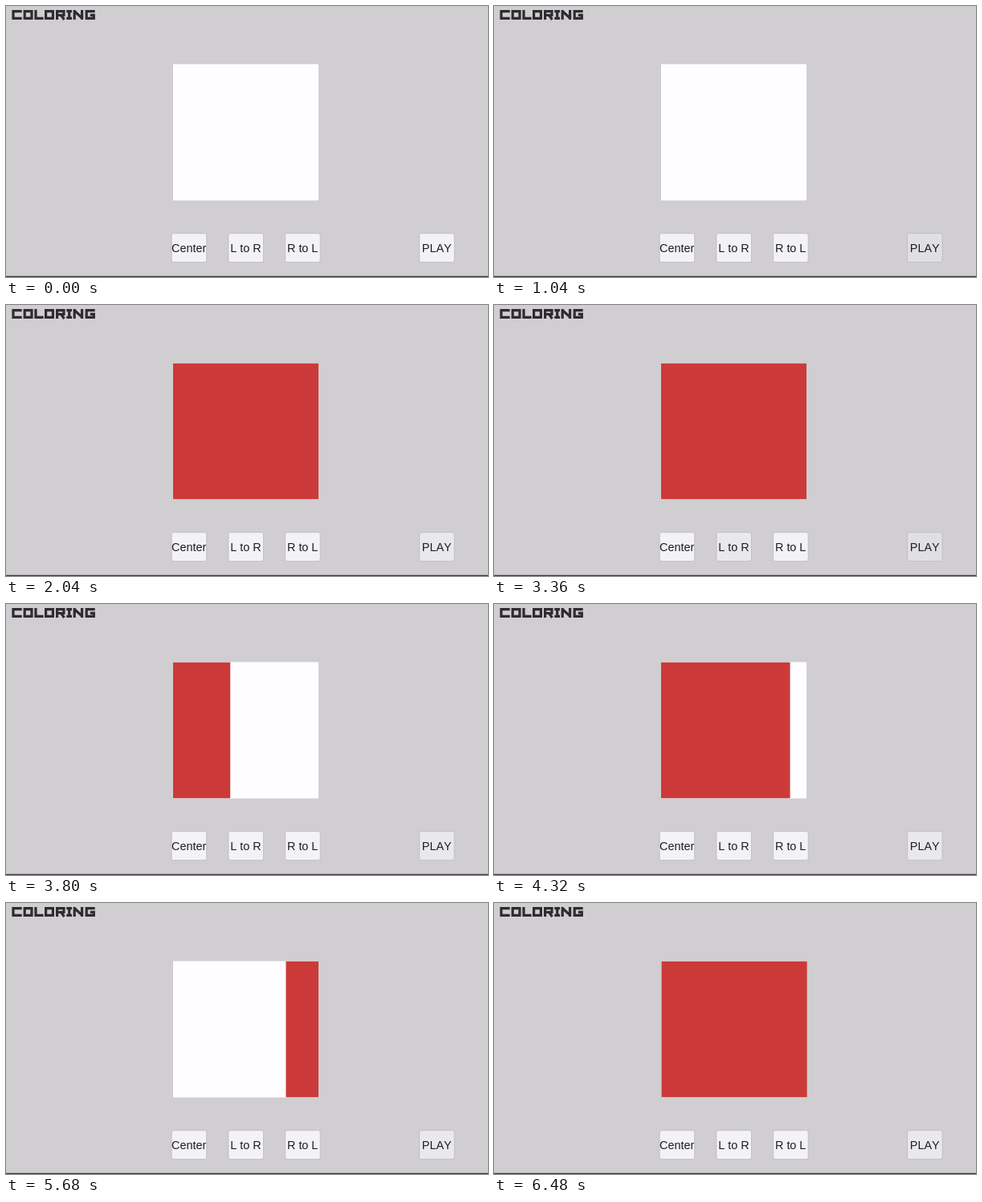
Recreate the animation shown at these times as an HTML page. Size 600x338 px, loop 7.32 s.

```html
<!DOCTYPE html>
<html lang="en">
<head>
<meta charset="utf-8">
<title>Coloring</title>
<style>
  html, body { margin: 0; width: 100%; height: 100%; overflow: hidden; background: #d0ced0; }
  svg { display: block; width: 100vw; height: 100vh; }

  .title { fill: none; stroke: #2e2c30; stroke-width: 3.2; }
  .key rect { width: 43.6px; height: 36px; fill: #f3f2f5; stroke: #bab8bb; stroke-width: .8; }
  .key text {
    font: 14.4px "Liberation Sans", Arial, sans-serif;
    font-kerning: none;
    text-anchor: middle;
    fill: #1f1e20;
  }

  .panel, .paint, .key rect { animation: 7320ms step-end infinite; }
  .panel { animation-name: nudge; }
  .paint { animation-name: wipe; }
  .center rect { animation-name: center; }
  .ltr rect { animation-name: ltr; }
  .rtl rect { animation-name: rtl; }
  .play rect { animation-name: play; }

  @keyframes nudge {
    0% { transform: none; }
    88.47%, 100% { transform: translateX(.6px); }
  }

  /* Three wipes: from the center, left to right (with a brief stall), right to left */
  @keyframes wipe {
    0% { clip-path: inset(0 50% 0 50%); }
    14.153% { clip-path: inset(0 50% 0 50%); animation-timing-function: steps(25); }
    27.814% { clip-path: inset(0 0% 0 0%); }
    46.94% { clip-path: inset(0 96.7% 0 0%); animation-timing-function: steps(15); }
    55.137% { clip-path: inset(0 36.7% 0 0%); }
    56.23% { clip-path: inset(0 31.3% 0 0%); animation-timing-function: steps(8); }
    60.601% { clip-path: inset(0 -.7% 0 0%); }
    74.809% { clip-path: inset(0 0% 0 97.6%); animation-timing-function: steps(25); }
    88.47%, 100% { clip-path: inset(0 0% 0 -2.4%); }
  }

  @keyframes center {
    0%, 14.153%, 100% { fill: #f3f2f5; }
    3.77% { fill: #e9e8eb; }
  }
  @keyframes ltr {
    0%, 46.393%, 100% { fill: #f3f2f5; }
    38.197% { fill: #e0dfe2; }
    39.836% { fill: #e9e8eb; }
  }
  @keyframes rtl {
    0%, 74.809%, 100% { fill: #f3f2f5; }
    67.158% { fill: #e0dfe2; }
    68.798% { fill: #e9e8eb; }
  }
  @keyframes play {
    0% { fill: #f3f2f5; }
    13.607%, 45.847%, 74.262% { fill: #e0dfe2; }
    15.246%, 47.486%, 75.902%, 100% { fill: #e9e8eb; }
  }
</style>
</head>
<body>
<svg viewBox="0 0 600 338" preserveAspectRatio="none">
  <rect width="600" height="338" fill="#d0ced0"/>
  <rect y="336.8" width="600" height="1.2" fill="#38373a"/>

  <path class="title" role="img" aria-label="COLORING" d="
    M19.7 6.6H9V15.4H19.7
    M23.2 6.6H32V15.4H23.2Z
    M37 5V15.4H46.6
    M49.6 6.6H58.4V15.4H49.6Z
    M63.6 17V6.6H72V11.5H64M68.5 11.5L72.5 17
    M75.3 6.6H82M78.7 6.6V15.4M75.3 15.4H82
    M85.2 17V5M94.6 5V17M85.2 6.5L94.6 15.2
    M110.7 6.6H100.2V15.4H109.3V11.4H104.8"/>

  <g class="panel">
    <rect x="208" y="72.5" width="181" height="170" fill="#fefdff"/>
    <rect class="paint" x="208" y="72.5" width="181" height="170" fill="#cb3a39"/>
  </g>

  <g class="key center"><rect x="206.1" y="283.6" rx="2.5"/><text x="227.7" y="307">Center</text></g>
  <g class="key ltr"><rect x="276.9" y="283.6" rx="2.5"/><text x="298.5" y="307">L to R</text></g>
  <g class="key rtl"><rect x="347.6" y="283.6" rx="2.5"/><text x="369.2" y="307">R to L</text></g>
  <g class="key play"><rect x="514.6" y="283.6" rx="2.5"/><text x="536.2" y="307">PLAY</text></g>
</svg>
</body>
</html>
```
